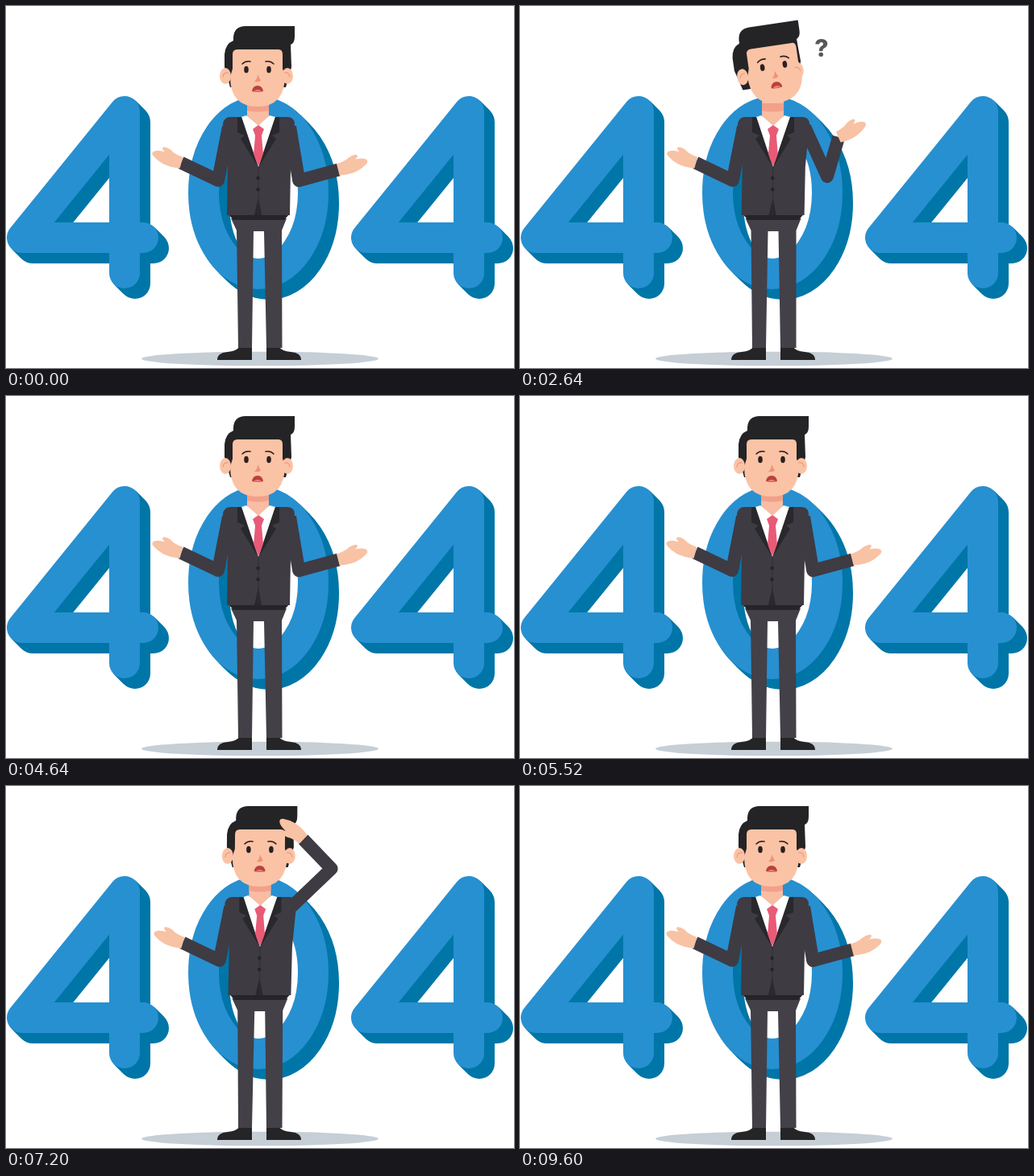
Recreate the animation shown at these times as an HTML page. Size 630 by 450 pixels, loop 9.68 s.

```html
<!DOCTYPE html>
<html>
<head>
<meta charset="utf-8">
<style>
html, body { margin: 0; width: 100%; height: 100%; overflow: hidden; background: #fff; }
svg { display: block; width: 630px; height: 450px; }
.line { fill: none; stroke-linecap: round; }
.sleeve { fill: none; stroke: #3e3b43; stroke-width: 16; stroke-linejoin: round; }
</style>
</head>
<body>
<svg viewBox="0 0 630 450">
  <defs>
    <g id="digits" fill="none" stroke-width="38" stroke-linecap="round" stroke-linejoin="round">
      <path id="four" d="M147 332V131L20 288H170"/>
      <use href="#four" x="427"/>
      <ellipse cx="313" cy="232" rx="68" ry="101"/>
    </g>
    <path id="hand" fill="#f8c2a4" d="M-2-7Q5-9 10-12Q16-18 23-18Q26-16 21-12Q29-14 34-12Q38-10 35-6Q29 0 22 3Q12 7 1 7Z"/>
  </defs>
  <g id="depth" stroke="#0076a8"></g>
  <use href="#digits" stroke="#2790d1"/>
  <ellipse cx="315" cy="438.5" rx="147" ry="8.8" fill="#c6ced6"/>
  <path fill="#252426" d="M289 424H305V440H262Q262 431 275 430Q286 429 289 424ZM323 424H339Q342 429 353 430Q366 431 366 440H323Z"/>

  <g id="man">
    <path fill="#434048" d="M279 264H348L342 279L342.500 425H323L320 280H307L305 425H288L286 279Z"/>
    <path fill="#252426" d="M276 259H351L345 266H282Z"/>
    <g id="leftArm" transform="translate(276 150) scale(-1 1)">
      <path class="sleeve"/><use href="#hand"/>
    </g>
    <path fill="#3e3b43" d="M278 138H349Q357 138 358 146L353 200L352 260H274L275 200L269 146Q271 138 278 138Z"/>
    <path fill="#fff" d="M292 138H334L313 200Z"/>
    <path fill="#f8bda3" d="M299 116H326V137L313 149L299 137Z"/>
    <path fill="#f2a08a" d="M299 121H326V130Q312 133 299 130Z"/>
    <path fill="#fff" d="M298 136L313 149L303 158L292 138ZM327 136L313 149L323 158L334 138Z"/>
    <path fill="#e95a76" d="M306 153L313 148L320 153L317 161L319 185L313 199L307 185L309 161Z"/>
    <path fill="#29282c" d="M287 138H292L312 199L291 165L296 161L287 157ZM339 138H334L314 199L335 165L330 161L339 157ZM313 238L308 260H317Z"/>
    <path class="line" stroke="#302e34" d="M313 200V260"/>
    <g fill="#252426"><circle cx="312.500" cy="214" r="2.200"/><circle cx="312.500" cy="228" r="2.200"/></g>

    <g id="head">
      <path fill="#242426" d="M282 43V39Q283 25 297 25H358V38Q358 46 353 48L354 76L347 101H278L271 76V60Q272 47 282 43Z"/>
      <g id="face">
        <g fill="#fbc3a5">
          <ellipse cx="272" cy="87" rx="7" ry="10"/>
          <path d="M281 60Q281 54 287 54H338Q343 54 343 60V78L346 86Q346 125 312 125Q278 125 278 88L281 78Z"/>
        </g>
        <path class="line" stroke="#f09a82" stroke-width="1.300" d="M269 88Q270 82 275 83"/>
        <g fill="#2b2021"><ellipse cx="298" cy="79" rx="2.800" ry="4.300"/><ellipse cx="326" cy="79" rx="2.800" ry="4.300"/></g>
        <path class="line" stroke="#2b2021" stroke-width="1.600" d="M293 72Q297 68 303 69M322 69Q328 68 332 72"/>
        <path fill="#f09078" d="M312 85L316 93Q312 95 308 94Q312 91 312 85Z"/>
        <path fill="#b9413f" d="M305 106Q306 99 312 99Q318 99 319 106Q312 108 305 106Z"/>
        <path fill="#ec7f80" d="M307 106Q312 102 317 106Q312 107 307 106Z"/>
      </g>
      <ellipse cx="349" cy="87" rx="7" ry="10" fill="#fbc3a5"/>
      <path class="line" stroke="#f09a82" stroke-width="1.300" d="M352 88Q351 82 346 83"/>
    </g>
    <g id="rightArm" transform="translate(352 150)">
      <path class="sleeve"/><use href="#hand"/>
    </g>
  </g>
  <text id="question" text-anchor="middle" y="11" fill="#58585a" font-family="Inter, Arial, sans-serif" font-weight="800" font-size="30">?</text>
</svg>
<script>
const LOOP = 9680, STEP = 80;
const $ = id => document.getElementById(id);

// Poses: upper arm, forearm and hand angles in degrees
const REST = [80.5, -15.5, -2], ASK = [65.5, -74, -12], SCRATCH = [-44, -134, -125], DROP = [82, -32, -17];
const LEFT_REST = [79, -25.5, -4], LEFT_BOUNCE = [76, -13, -4];

const tracks = {
  right: [[400, REST], [1000, ASK], [2720, ASK], [3120, REST], [5800, REST], [6640, SCRATCH],
          [7760, SCRATCH], [8320, DROP], [8640, REST]],
  left: [[3040, LEFT_REST], [3280, LEFT_BOUNCE], [3600, LEFT_REST], [5680, LEFT_REST], [5920, LEFT_BOUNCE],
         [6320, LEFT_REST], [8000, LEFT_REST], [8360, LEFT_BOUNCE], [8720, LEFT_REST]],
  lean: [[400, [0]], [1000, [1]], [2960, [1]], [3600, [0]], [5680, [0]], [6600, [2.3]],
         [7760, [2.3]], [8320, [3.5]], [8720, [0]]],
  tilt: [[400, [0]], [960, [1]], [3040, [1]], [3520, [0]]],
  question: [[800, [0]], [1040, [1]], [2800, [1]], [3040, [0]]]
};

function sample(track, t) {
  const i = track.findIndex(key => key[0] > t);
  if (i < 0) return track[track.length - 1][1];
  if (i === 0) return track[0][1];
  const [t0, a] = track[i - 1], [t1, b] = track[i];
  const u = (t - t0) / (t1 - t0), ease = u * u * (3 - 2 * u);
  return a.map((v, k) => v + (b[k] - v) * ease);
}

function poseArm(arm, [upper, fore, hand]) {
  const rad = Math.PI / 180;
  const ex = 68 * Math.cos(upper * rad), ey = 68 * Math.sin(upper * rad);
  const wx = ex + 51 * Math.cos(fore * rad), wy = ey + 51 * Math.sin(fore * rad);
  arm.children[0].setAttribute('d', `M0 0L${ex} ${ey}L${wx} ${wy}`);
  arm.children[1].setAttribute('transform', `translate(${wx} ${wy}) rotate(${hand})`);
}

function draw(t) {
  const right = [...sample(tracks.right, t)];
  if (t > 6640 && t < 7760) {
    const wiggle = 4 * Math.sin((t - 6640) / 1120 * Math.PI * 8);
    right[1] += wiggle;
    right[2] += wiggle;
  }
  poseArm($('rightArm'), right);
  poseArm($('leftArm'), sample(tracks.left, t));

  const [lean] = sample(tracks.lean, t), [tilt] = sample(tracks.tilt, t), [pop] = sample(tracks.question, t);
  const k = lean / 275;
  $('man').setAttribute('transform', `matrix(1 0 ${-k} 1 ${k * 425} 0)`);
  $('head').setAttribute('transform', `translate(0 ${-2 * tilt}) rotate(${-8.5 * tilt} 313 122)`);
  $('face').setAttribute('transform', `translate(${8 * tilt} ${-2 * tilt})`);
  $('question').setAttribute('transform', `translate(374 52) scale(${pop})`);
}

for (let d = 13; d > 0; d--) $('depth').innerHTML += `<use href="#digits" x="${d}" y="${d}"/>`;

const start = performance.now();
function tick() {
  const t = (performance.now() - start) % LOOP;
  draw(Math.floor(t / STEP) * STEP);
  requestAnimationFrame(tick);
}
tick();
</script>
</body>
</html>
```
